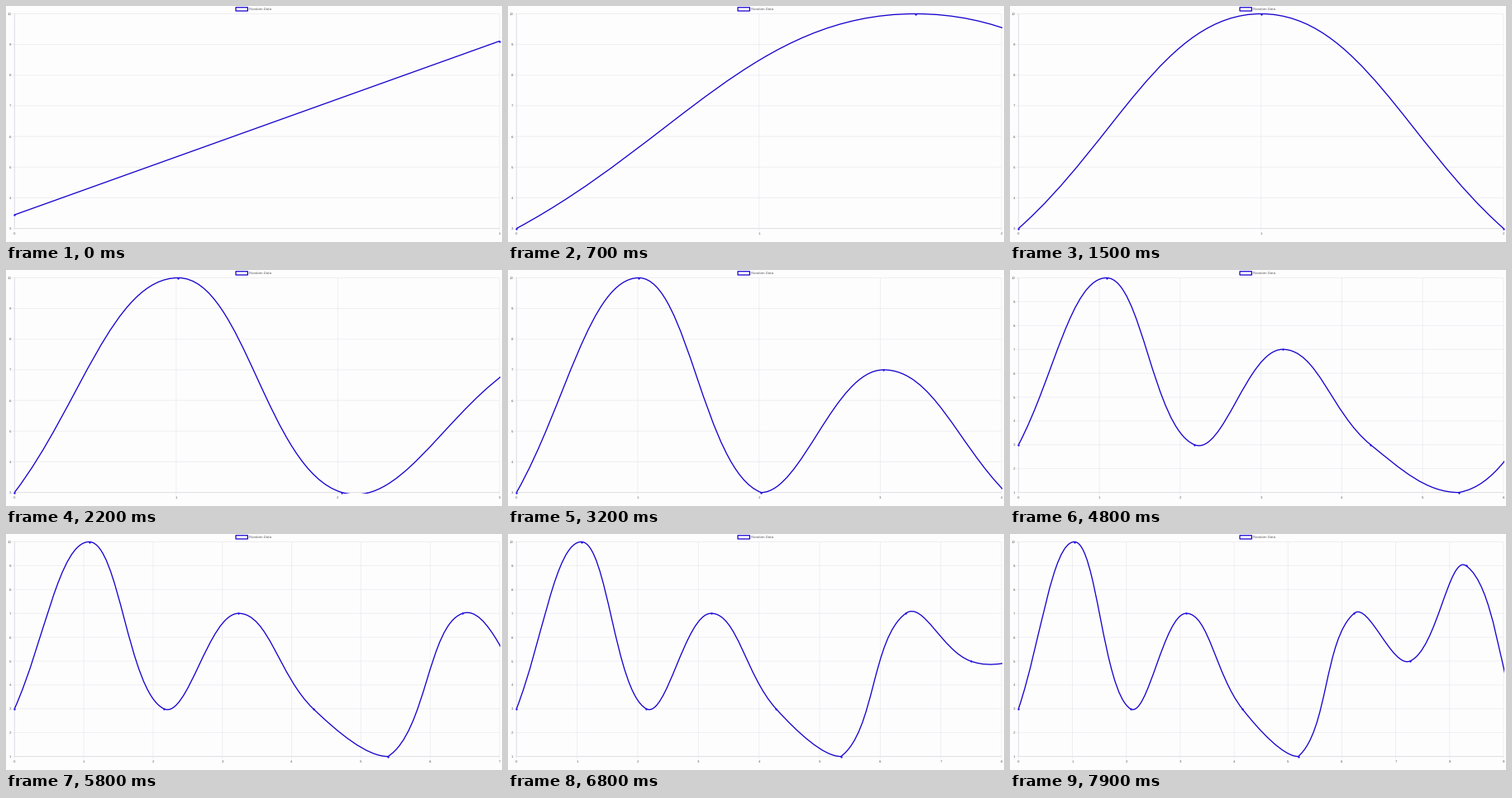
A matplotlib script for the animation above (8 s loop, 600 by 286 pixels).

```python
import matplotlib.pyplot as plt
import numpy as np
from matplotlib.animation import FuncAnimation
from matplotlib.patches import PathPatch, Rectangle
from matplotlib.path import Path

W, H, DPI = 600, 286, 100
PX = 72 / DPI                                  # points per pixel
LEFT, RIGHT, TOP, BOTTOM = 10.3, 597.0, 9.5, 269.6
BACK, GRID, AXIS, TEXT = "#fefdfe", "#ededf1", "#dfdee5", "#5c5c5c"
BLUE, DOT = "#1400cc", "#2412ee"
FRAMES, STEP, GLIDE, TENSION, BLEED = 80, 100, 1000, 0.4, 1.3

VALUES = np.array([3, 10, 3, 7, 3, 1, 7, 5, 9, 2], float)
ARRIVALS = [-403, 596, 1601, 2606, 3612, 4617, 5627, 6637, 7642]

plt.rcParams["font.family"] = "Liberation Sans"
plt.rcParams["text.hinting"] = "none"

fig = plt.figure(figsize=(W / DPI, H / DPI), dpi=DPI, facecolor=BACK)
ax = fig.add_axes([0, 0, 1, 1])


def value_range(n):
    lo, hi = VALUES[:n].min(), VALUES[:n].max()
    return (lo, hi) if hi > lo else (lo - 0.15, hi + 0.15)


def to_y(v, span):
    lo, hi = span
    return BOTTOM - (v - lo) / (hi - lo) * (BOTTOM - TOP)


def spacing(n):
    return (RIGHT - LEFT) / max(n - 1, 1)


def layout(count, n):
    """First `count` points on the scales of a chart that holds n values."""
    x = LEFT + np.arange(count) * spacing(n)
    y = to_y(VALUES[:count], value_range(n))
    y[n:] = BOTTOM                             # a new point rises from the base
    return np.column_stack([x, y])


def inside(p, margin=0.5):
    return (LEFT - margin < p[0] < RIGHT + margin
            and TOP - margin < p[1] < BOTTOM + margin)


def spline(pts):
    """Cubic path whose handles stay in the chart next to visible points."""
    last = len(pts) - 1
    before, after = [], []
    for i, p in enumerate(pts):
        a, b = pts[max(i - 1, 0)], pts[min(i + 1, last)]
        d0, d1 = np.hypot(*(p - a)), np.hypot(*(b - p))
        pull = TENSION * (b - a) / (d0 + d1)
        h0, h1 = p - pull * d0, p + pull * d1
        if inside(p):
            lo, hi = (LEFT, TOP), (RIGHT, BOTTOM)
            if i > 0 and inside(a):
                h0 = np.clip(h0, lo, hi)
            if i < last and inside(b):
                h1 = np.clip(h1, lo, hi)
        before.append(h0)
        after.append(h1)
    verts = [pts[0]]
    for i in range(last):
        verts += [after[i], before[i + 1], pts[i + 1]]
    return Path(verts, [Path.MOVETO] + [Path.CURVE4] * (3 * last))


def rule(xs, ys, color, z):
    ax.plot(xs, ys, color=color, lw=0.9 * PX, zorder=z, snap=False,
            solid_capstyle="butt")


def label(x, y, s, ha):
    ax.text(x, y, s, ha=ha, va="center_baseline", color=TEXT,
            fontsize=4.35 * PX)


def draw_scales(n):
    lo, hi = value_range(n)
    for v in range(int(lo), int(hi) + 1):
        y = to_y(v, (lo, hi))
        rule([LEFT - 2.9, RIGHT], [y, y], GRID, 1)
        label(6.4, y, str(v), "right")
    for i in range(n):
        x = LEFT + i * spacing(n)
        rule([x, x], [TOP, BOTTOM + 2.9], GRID, 1)
        label(x, 275.9, str(i), "center")
    rule([LEFT, LEFT], [TOP, BOTTOM], AXIS, 2)
    rule([LEFT, RIGHT], [BOTTOM, BOTTOM], AXIS, 2)


def draw_legend():
    ax.add_patch(Rectangle((278, 1.7), 14.4, 4.3, fc="none", ec=BLUE,
                           lw=1.25 * PX, snap=False))
    label(294.3, 3.5, "Random Data", "left")


def draw(frame):
    t = frame * STEP
    k = int(np.searchsorted(ARRIVALS, t, side="right")) - 1
    n = k + 2
    p = min((t - ARRIVALS[k]) / GLIDE, 1)
    ease = 1 - (1 - p) ** 4
    old, new = layout(n, n - 1), layout(n, n)
    pts = old + (new - old) * ease

    ax.cla()
    ax.set(xlim=(0, W), ylim=(H, 0))
    ax.axis("off")
    draw_scales(n)
    draw_legend()

    curve = PathPatch(spline(pts), fc="none", ec=BLUE, lw=1.3 * PX, zorder=4)
    ax.add_patch(curve)
    curve.set_clip_path(Rectangle(
        (LEFT - BLEED, TOP - BLEED), RIGHT - LEFT + 2 * BLEED,
        BOTTOM - TOP + 2 * BLEED, transform=ax.transData))
    seen = np.array([q for q in pts if inside(q, 1)])
    ax.plot(seen[:, 0], seen[:, 1], "o", ms=2.4 * PX, mfc=DOT, mec="none",
            zorder=5)
    return []


anim = FuncAnimation(fig, draw, frames=FRAMES, interval=STEP,
                     init_func=lambda: draw(0), repeat=True, repeat_delay=0)
plt.show()
```
